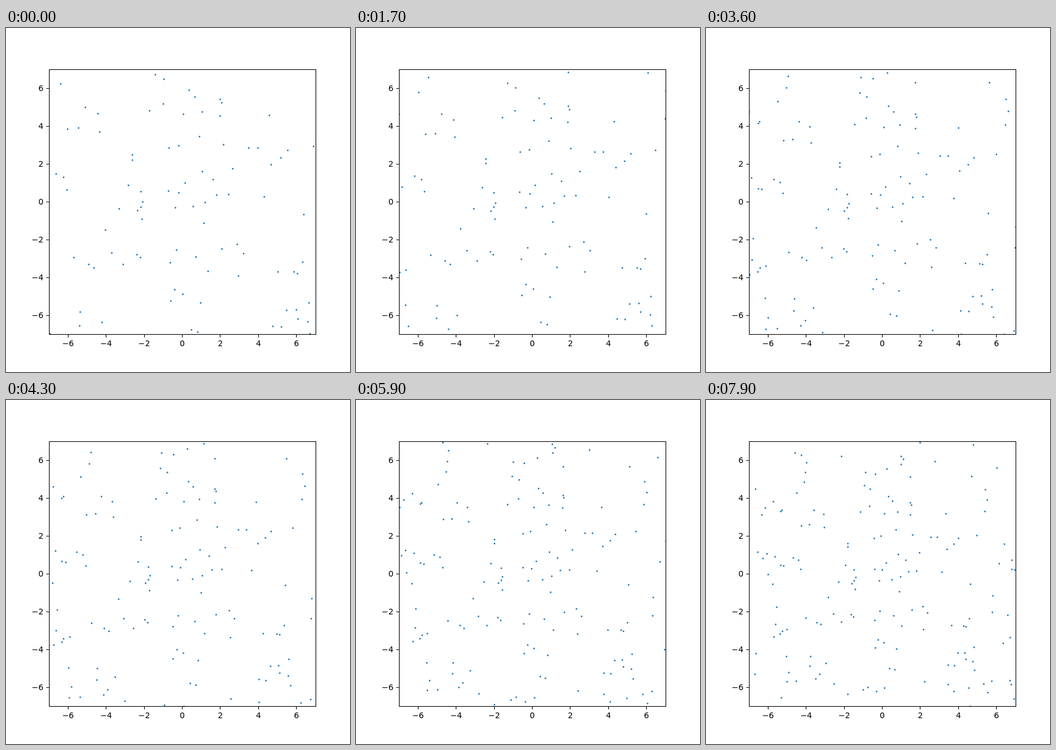
An HTML page that plays this animation: 600 by 600 pixels, repeating every 8 s.

```html
<!DOCTYPE html>
<html lang="en">
<head>
<meta charset="utf-8">
<title>Contracting scatter plot</title>
<style>
  html, body { margin: 0; width: 100%; height: 100%; overflow: hidden; background: #fff; }
  svg { display: block; width: 100vw; height: 100vh; }
  text { font: 13.89px "DejaVu Sans", sans-serif; fill: #000; }
  .axes { fill: none; stroke: #000; stroke-width: 1.11; }
  .dots { fill: #1f77b4; }
</style>
</head>
<body>
<svg viewBox="0 0 600 600">
  <clipPath id="plot"><rect x="75" y="72" width="465" height="462"/></clipPath>
  <g class="dots" clip-path="url(#plot)"></g>
  <g class="axes"><rect x="75.5" y="72.5" width="465" height="462"/></g>
  <g class="labels"></g>
</svg>
<script>
const LOOP = 8000, STEP = 100, LAST = LOOP - STEP;
const CENTER = { x: 307.9, y: 303 };
const CORE = { left: 185, right: 430, top: 160, bottom: 450 };
const HALO_COUNT = 126, HALO_REACH = 283, DOT_RADIUS = 1.39;

// Inner dots as x, y pairs, placed where they are at MID_TIME.
const MID_TIME = 3600;
const core = [
  259,168, 310,173, 338,169, 365,175, 334,206, 288,224, 303,220, 370,218,
  408,223, 422,223, 233,235, 233,242, 339,259, 384,255, 355,271, 227,281,
  313,277, 246,290, 288,289, 304,291, 360,295, 378,294, 249,306, 246,313,
  241,319, 248,332, 213,316, 298,314, 325,312, 343,306, 341,337, 192,348,
  391,369, 368,376, 300,378, 401,383, 202,383, 240,385, 245,390, 329,388,
  219,400, 290,397, 347,410, 393,417, 297,438, 309,445
];

const svg = document.querySelector("svg");
const group = name => svg.querySelector("." + name);

function add(parent, tag, attrs, content = "") {
  const node = document.createElementNS(svg.namespaceURI, tag);
  for (const key in attrs) node.setAttribute(key, attrs[key]);
  node.textContent = content;
  parent.append(node);
  return node;
}

function seededRandom(seed) {
  return () => {
    seed = (Math.imul(seed, 1664525) + 1013904223) >>> 0;
    return seed / 2 ** 32;
  };
}

function drawAxes() {
  for (let value = -6; value <= 6; value += 2) {
    const x = CENTER.x - 0.4 + value * 465 / 14;
    const y = CENTER.y - value * 33;
    const label = String(value).replace("-", "\u2212");
    add(group("axes"), "path", {
      d: `M${Math.floor(x) + 0.5} 535v4.86M75 ${y + 0.5}h-4.86`
    });
    add(group("labels"), "text", { x, y: 555, "text-anchor": "middle" }, label);
    add(group("labels"), "text", { x: 65.3, y: y + 5, "text-anchor": "end" }, label);
  }
}

function makeDot(x, y) {
  const dx = x - CENTER.x, dy = y - CENTER.y;
  const lag = Math.exp(-(dx * dx + dy * dy) / 4900);
  return {
    x, y,
    driftX: -0.331 * dx + 2.08 * (1 + lag),
    driftY: -0.327 * dy + 5.55 - 0.0134 * dx,
    node: add(group("dots"), "circle", { r: DOT_RADIUS })
  };
}

function makeDots() {
  const dots = [];
  for (let i = 0; i < core.length; i += 2) dots.push(makeDot(core[i], core[i + 1]));
  const random = seededRandom(2024);
  const spread = () => (random() * 2 - 1) * HALO_REACH;
  while (dots.length < core.length / 2 + HALO_COUNT) {
    const x = CENTER.x + spread(), y = CENTER.y + spread();
    const inCore = x > CORE.left && x < CORE.right && y > CORE.top && y < CORE.bottom;
    if (!inCore) dots.push(makeDot(x, y));
  }
  return dots;
}

// Nearly constant speed, slowing a little.
function progress(time) {
  const u = time / LAST;
  return u + 0.06 * u * (1 - u);
}

drawAxes();
const dots = makeDots();

function render(time) {
  const shift = progress(time) - progress(MID_TIME);
  for (const dot of dots) {
    dot.node.setAttribute("cx", Math.round(dot.x + dot.driftX * shift) + 0.5);
    dot.node.setAttribute("cy", Math.round(dot.y + dot.driftY * shift) + 0.5);
  }
}

const start = performance.now();
function tick() {
  const time = (performance.now() - start) % LOOP;
  render(Math.floor(time / STEP) * STEP);
  requestAnimationFrame(tick);
}
tick();
</script>
</body>
</html>
```
